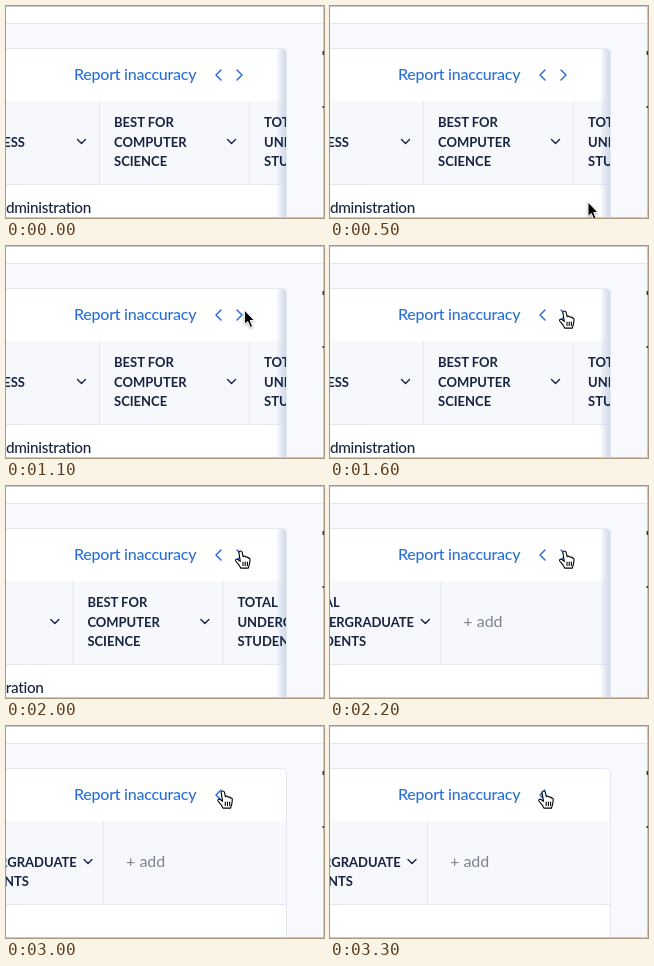
These frames come from a looping animation (318x212 px, 3400 ms). An HTML page:

```html
<!DOCTYPE html>
<html lang="en">
<head>
<meta charset="utf-8">
<title>Scrolling comparison table</title>
<style>
  html, body { margin: 0; width: 100%; height: 100%; overflow: hidden; background: #fff; }
  svg { display: block; width: 100%; height: 100%; }
  text { font-family: Lato, "Open Sans", sans-serif; font-size: 16px; fill: #17243f; font-variant-ligatures: none; }
  .head text { font-size: 13px; font-weight: 700; }
  .head .add { font-size: 16px; font-weight: 400; fill: #7b8390; }
  .cell { font-size: 15.3px; font-weight: 500; letter-spacing: -.3px; }
  .link { font-weight: 500; fill: #2a70d8; letter-spacing: -.25px; }
  .line { stroke: #e3e8f1; fill: none; }
  .icon { fill: none; stroke: #17243f; stroke-width: 1.4; stroke-linecap: round; stroke-linejoin: round; }
  .nav { stroke: #2a70d8; stroke-width: 1.5; }
  #arrow { filter: drop-shadow(0 1px 1px rgba(0, 0, 0, .3)); }
</style>
</head>
<body>
<svg viewBox="0 0 318 212">
  <defs>
    <linearGradient id="fade">
      <stop offset="0" stop-color="#cfd9ea" stop-opacity="0"/>
      <stop offset=".4" stop-color="#cfd9ea" stop-opacity=".45"/>
      <stop offset="1" stop-color="#cfd9ea"/>
    </linearGradient>
    <clipPath id="panel"><path d="M0 42H275Q281 42 281 48V212H0Z"/></clipPath>
  </defs>

  <rect width="318" height="212" fill="#f7f9fd"/>
  <rect width="318" height="17" fill="#fff"/>
  <path class="line" d="M0 17.5H318"/>

  <g clip-path="url(#panel)">
    <rect y="42" width="281" height="170" fill="#fff"/>
    <rect y="95" width="281" height="83" fill="#f6f8fc"/>
    <path class="line" d="M0 178.5H281"/>
    <rect id="shadow" x="270" y="43" width="10" height="169" fill="url(#fade)"/>
    <g id="head" class="head"></g>
    <g id="body"><text class="cell" x="85" y="207" text-anchor="end">Business administration</text></g>
  </g>
  <path class="line" d="M0 42.5H275Q280.5 42.5 280.5 48V212"/>

  <text class="link" x="68" y="74">Report inaccuracy</text>
  <path class="icon nav" d="M215 64L210 69L215 74"/>
  <path id="next" class="icon nav" d="M231 64L236 69L231 74"/>

  <path d="M0 .5H318M0 211.5H318M317.5 0V212" stroke="#c5c9d0"/>
  <path d="M317.3 45V49M317.3 100V102" stroke="#27324a" stroke-width="1.4"/>

  <path id="arrow" d="M0 0V14.5L3.3 11.5L5.8 17.4L8.2 16.4L5.7 10.6H10Z" fill="#000" stroke="#fff" stroke-width="1" stroke-linejoin="round"/>
  <g id="hand" stroke="#000" stroke-width="1.1" stroke-linejoin="round" stroke-linecap="round">
    <path fill="#fff" d="M-2.7 1.6C-2.4 0 .2 0 .6 1.5L1.6 6C2.8 5.2 4.2 5.5 4.5 6.7C5.6 6.1 6.6 6.5 6.9 7.6C8 7.3 8.7 8 8.5 9.3L8.1 13L6.8 17.5H-.8L-2.6 14.2L-5.8 10.4C-6.5 9 -5 7.9 -3.6 8.9L-1.2 10.8Z"/>
    <path fill="none" d="M1.5 11.5V15M3.7 11.5V15M5.9 11.5V15"/>
  </g>
</svg>
<script>
const LOOP = 3400, STEP = 100, SCROLL = 302;
const $ = id => document.getElementById(id);
const clamp = x => Math.min(1, Math.max(0, x));
const mix = (a, b, p) => a + (b - a) * p;
const smooth = p => (1 - Math.cos(Math.PI * p)) / 2;
const move = (el, x, y = 0) => el.setAttribute('transform', `translate(${x.toFixed(2)} ${y.toFixed(2)})`);
const show = (el, opacity) => el.setAttribute('opacity', opacity);

// Column header: left rule, stacked words and a menu chevron
function column(left, words, menu) {
  const lines = words.map((w, i) => `<text x="${left + 15}" y="${121 + i * 19.5 + (3 - words.length) * 9.75}">${w}</text>`);
  return `<path class="line" d="M${left + .5} 95V178"/>${lines.join('')}` +
    `<path class="icon" d="M${menu - 4} 133.5l4 4l4-4"/>`;
}

$('head').innerHTML =
  column(-57, ['BUSINESS'], 75.5) +
  column(93, ['BEST FOR', 'COMPUTER', 'SCIENCE'], 225.5) +
  column(243, ['TOTAL', 'UNDERGRADUATE', 'STUDENTS'], 384) +
  '<path class="line" d="M399.5 95V178"/><text class="add" x="422" y="141">+ add</text>';

const scrollAt = (t, start) => SCROLL * smooth(clamp((t - start) / 297));

function pointer(t) {
  const isHand = t >= 1400;
  show($('arrow'), t >= 500 && !isHand ? 1 : 0);
  show($('hand'), isHand ? 1 : 0);

  const enter = 1 - (1 - clamp((t - 500) / 450)) ** 2.5;
  move($('arrow'), mix(258, 238.4, enter), mix(196, 64, enter));

  const settle = clamp((t - 1400) / 200);
  const back = t < 2900 ? 0 : 1 - .3 ** ((t - 2800) / 130);
  move($('hand'), mix(237, 235.5, settle) - 21 * back, 64.6);
}

function draw(time) {
  const t = Math.floor(time % LOOP / STEP) * STEP;
  move($('head'), -scrollAt(t, 1943));
  move($('body'), -scrollAt(t, 1923));
  show($('shadow'), 1 - clamp((t - 2200) / 200));
  show($('next'), t < 2300 ? 1 : 0);
  pointer(t);
}

const start = performance.now();
function tick() {
  draw(performance.now() - start);
  requestAnimationFrame(tick);
}
tick();
</script>
</body>
</html>
```
